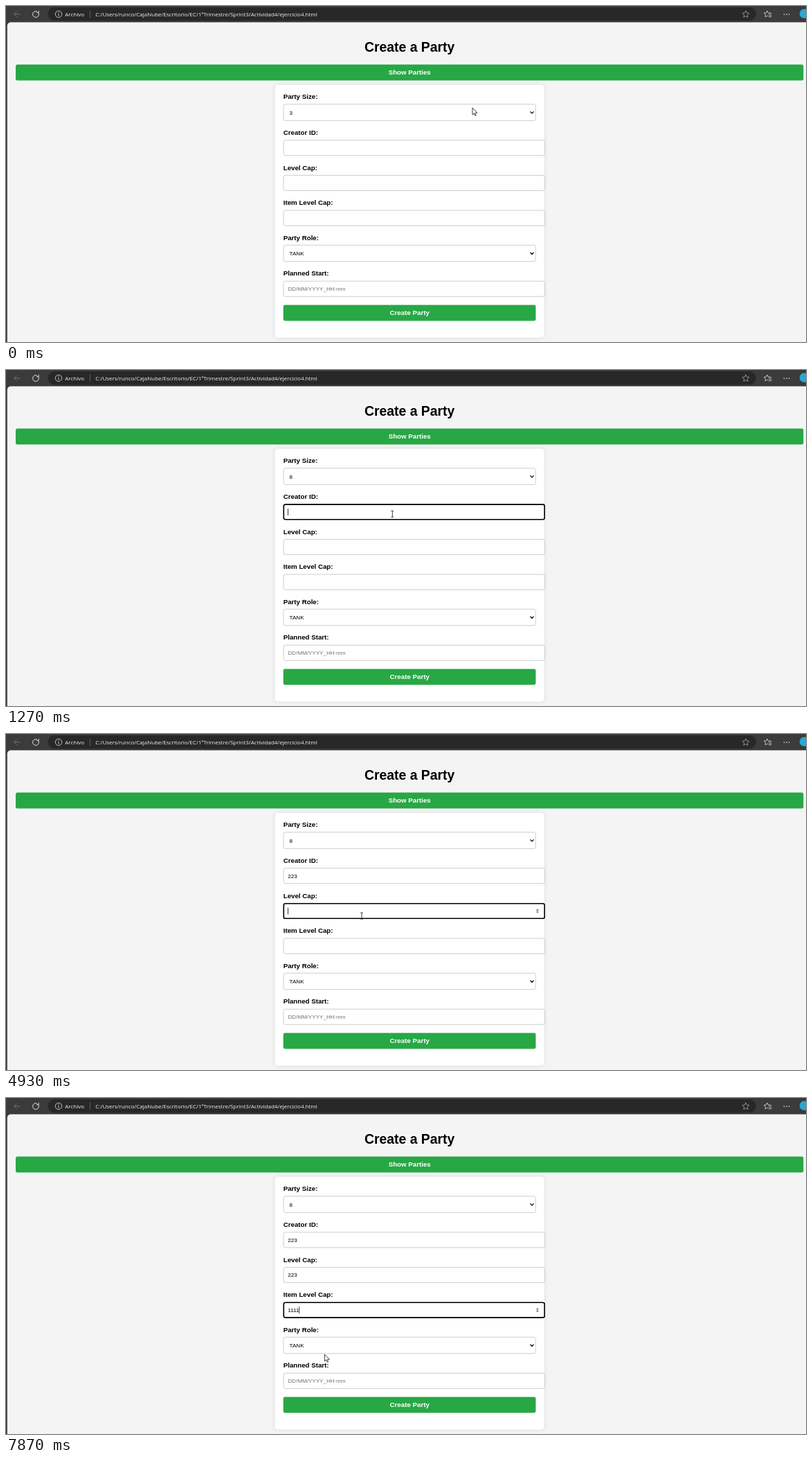
Write an HTML page with a canvas that moves like this. It is 1156 px wide and 485 px high and loops after 8000 ms.

```html
<!DOCTYPE html>
<html lang="es">
<head>
<meta charset="utf-8">
<title>Create a Party</title>
<style>
html, body { margin: 0; width: 100%; height: 100%; overflow: hidden; background: #3b3b3b; }
canvas { display: block; width: 1156px; height: 485px; }
</style>
</head>
<body>
<canvas id="stage"></canvas>
<script>
const W = 1156, H = 485, LOOP = 8000, TICKS_PER_SECOND = 15;
const canvas = document.getElementById('stage');
const dpr = window.devicePixelRatio || 1;
canvas.width = W * dpr;
canvas.height = H * dpr;
const ctx = canvas.getContext('2d');
ctx.scale(dpr, dpr);

const SANS = '"Liberation Sans", Arial, sans-serif';
const SMALL = `8.1px ${SANS}`;
const LABEL = `bold 9.73px ${SANS}`;
const TITLE = `bold 19.4px ${SANS}`;
const CHROME = '8px "Open Sans", "Noto Sans", sans-serif';
const GREEN = '#28a745';

const LEFT = 400.7, SELECT_W = 364.8, INPUT_W = 378, INPUT_H = 22.7;
const labels = [['Party Size:', 134.4], ['Creator ID:', 186], ['Level Cap:', 236.6],
  ['Item Level Cap:', 287.2], ['Party Role:', 337.8], ['Planned Start:', 389.4]];
const inputs = [
  { y: 193.5 }, { y: 244.1, number: true }, { y: 294.7, number: true },
  { y: 396.9, hint: 'DD/MM/YYYY_HH:mm' }
];

// Times below are in ticks of 1/15 s.
const edits = [[19.15, 0, ''], [40, 0, '2'], [60, 0, '22'], [66, 0, '223'],
  [74, 1, ''], [79, 1, '2'], [83, 1, '22'], [93, 1, '223'],
  [97, 2, ''], [105, 2, '1'], [109, 2, '11'], [111, 2, '111'], [114, 2, '1111']];
const pointerPath = [[0, 674, 147], [1, 674, 147], [2, 670, 149], [4, 640, 172], [6, 602, 203],
  [8, 579, 215.5], [12, 558.3, 207.8], [24, 558.3, 207.8], [26, 556.8, 199.8], [44, 556.8, 199.8],
  [49, 519, 276], [53, 514, 262.5], [84, 514, 262.5], [87, 498.4, 276.4], [90, 498.4, 276.4],
  [95, 465, 308.5], [113, 465, 308.5], [118, 460.4, 370]];
const POPUP_OPEN = 3, POPUP_CLOSE = 15, TEXT_POINTER = 17, BLINK = 7.92;

function box(x, y, w, h, r, fill, stroke, width = 0.9) {
  ctx.beginPath();
  ctx.roundRect(x, y, w, h, r);
  if (fill) { ctx.fillStyle = fill; ctx.fill(); }
  if (stroke) { ctx.strokeStyle = stroke; ctx.lineWidth = width; ctx.stroke(); }
}

function write(str, x, y, font, color = '#000', align = 'left') {
  ctx.font = font;
  ctx.fillStyle = color;
  ctx.textAlign = align;
  ctx.fillText(str, x, y);
}

function line(points, color, width) {
  ctx.beginPath();
  points.forEach(([x, y]) => ctx.lineTo(x, y));
  ctx.strokeStyle = color;
  ctx.lineWidth = width;
  ctx.stroke();
}

function polygon(points, fill) {
  ctx.beginPath();
  points.forEach(([x, y]) => ctx.lineTo(x, y));
  ctx.closePath();
  if (fill) { ctx.fillStyle = fill; ctx.fill(); }
}

function disc(x, y, r, fill) {
  ctx.beginPath();
  ctx.arc(x, y, r, 0, Math.PI * 2);
  ctx.fillStyle = fill;
  ctx.fill();
}

function shadowed(blur, alpha, dy, draw) {
  ctx.save();
  ctx.shadowColor = `rgba(0,0,0,${alpha})`;
  ctx.shadowBlur = blur * dpr;
  ctx.shadowOffsetY = dy * dpr;
  draw();
  ctx.restore();
}

function star(x, y, r, color) {
  const points = Array.from({ length: 10 }, (_, i) => {
    const a = i * Math.PI / 5 - Math.PI / 2, d = i % 2 ? r * 0.48 : r;
    return [x + d * Math.cos(a), y + d * Math.sin(a)];
  });
  polygon(points);
  ctx.strokeStyle = color;
  ctx.lineWidth = 0.8;
  ctx.stroke();
}

function drawBrowserBar() {
  const light = '#e4e4e4';
  ctx.fillStyle = '#3b3b3b';
  ctx.fillRect(0, 0, W, H);
  box(60.5, 2, 1023.5, 19.3, 9.6, '#282828');

  line([[21, 11.8], [11.8, 11.8]], '#777', 0.9);
  line([[15.8, 7.8], [11.8, 11.8], [15.8, 15.8]], '#777', 0.9);

  ctx.beginPath();
  ctx.arc(43, 12, 4.4, -0.5, Math.PI * 2 - 1.1);
  ctx.strokeStyle = light;
  ctx.lineWidth = 1;
  ctx.stroke();
  line([[47.2, 6.8], [47.2, 9.7], [44.2, 9.7]], light, 1);

  ctx.beginPath();
  ctx.arc(76, 11.8, 4.7, 0, Math.PI * 2);
  ctx.lineWidth = 0.8;
  ctx.stroke();
  line([[76, 11.2], [76, 14.4]], light, 0.9);
  disc(76, 9.5, 0.6, light);

  write('Archivo', 85.3, 14.8, CHROME, '#f0f0f0');
  line([[121.5, 6.5], [121.5, 17]], '#6a6a6a', 0.8);
  write('C:/Users/runco/CajaNube/Escritorio/EC/1ºTrimestre/Sprint3/Actividad4/ejercicio4.html',
    129.3, 14.8, CHROME, '#f0f0f0');

  star(1069, 12, 5.3, '#aaa');
  star(1099.8, 11.8, 4.9, light);
  ctx.fillStyle = '#3b3b3b';
  ctx.fillRect(1101.3, 10.6, 6, 7);
  [10.8, 13.2, 15.6].forEach(y => line([[1102, y], [1106.3, y]], light, 0.8));
  [1124.4, 1128, 1131.6].forEach(x => disc(x, 12, 0.85, light));
  disc(1153.5, 11, 6.8, '#2ba6d8');
}

function drawSelect(y, h, value, focused) {
  box(LEFT + 0.4, y, SELECT_W - 0.6, h, 2.4, '#fff', focused ? '#000' : '#c8c8c8', focused ? 1.5 : 0.9);
  write(value, 409.6, y + h / 2 + 2.9, SMALL);
  const m = y + h / 2;
  line([[757.5, m - 1.2], [760, m + 1.3], [762.5, m - 1.2]], '#000', 1.3);
}

function drawSpinner(y) {
  const m = y + INPUT_H / 2;
  polygon([[765.8, m - 0.8], [770, m - 0.8], [767.9, m - 2.9]], '#555');
  polygon([[765.8, m + 0.8], [770, m + 0.8], [767.9, m + 2.9]], '#555');
}

function drawInput(input, value, focused, hovered, caret) {
  const { y } = input, base = y + INPUT_H / 2 + 2.9, x = 407.2;
  box(LEFT + 0.4, y + 0.3, INPUT_W - 0.7, INPUT_H - 0.6, 2.4, '#fff', '#c8c8c8');
  if (focused) box(LEFT + 0.6, y + 0.6, INPUT_W - 1.1, INPUT_H - 1.1, 2.4, null, '#000', 1.6);
  if (input.hint) write(input.hint, x, base, SMALL, '#757575');
  write(value, x, base, SMALL);
  if (caret) {
    ctx.fillStyle = '#000';
    ctx.fillRect(x + ctx.measureText(value).width, base - 7.6, 0.8, 9.6);
  }
  if (input.number && (focused || hovered)) drawSpinner(y);
}

function drawButton(label, x, y, w) {
  box(x, y, w, 23.1, 2.4, GREEN);
  write(label, 583.2, y + 14.9, LABEL, '#fff', 'center');
}

function drawPopup(tick) {
  const top = 168.2, row = 14.7;
  const active = tick < 5 ? 0 : tick < 7 ? 1 : 2;
  shadowed(4, 0.35, 1.5, () => box(401, top, 364.5, row * 3 + 0.8, 0, '#fff'));
  ['3', '5', '8'].forEach((value, i) => {
    const y = top + 0.4 + i * row;
    if (i === active) {
      ctx.fillStyle = '#767676';
      ctx.fillRect(401, y, 364.5, row);
    }
    write(value, 409.6, y + 10.3, SMALL, i === active ? '#fff' : '#000');
  });
  box(401.2, top, 364.2, row * 3 + 0.6, 0, null, '#686868', 0.9);
}

function pointerAt(tick) {
  const next = pointerPath.findIndex(([at]) => at > tick);
  if (next < 0) return pointerPath[pointerPath.length - 1].slice(1);
  const [t0, x0, y0] = pointerPath[next - 1], [t1, x1, y1] = pointerPath[next];
  const k = (tick - t0) / (t1 - t0);
  return [x0 + (x1 - x0) * k, y0 + (y1 - y0) * k];
}

function drawPointer(x, y, overText) {
  if (overText) {
    line([[x - 2, y - 4.4], [x + 2, y - 4.4]], '#222', 0.8);
    line([[x, y - 4.4], [x, y + 4.6]], '#222', 0.9);
    line([[x - 2, y + 4.6], [x + 2, y + 4.6]], '#222', 0.8);
    return;
  }
  const arrow = [[0, 0], [0, 10], [2.3, 7.9], [3.8, 11.4], [5.3, 10.8], [3.9, 7.4], [7, 7.2]];
  polygon(arrow.map(([dx, dy]) => [x + dx, y + dy]), '#fff');
  ctx.strokeStyle = '#111';
  ctx.lineWidth = 0.8;
  ctx.stroke();
}

function render(time) {
  const tick = Math.floor((time % LOOP + 4) * TICKS_PER_SECOND / 1000);
  const [px, py] = pointerAt(tick);
  const values = ['', '', '', ''];
  let focus = -1, editedAt = 0;
  for (const [at, field, value] of edits) {
    if (tick < Math.floor(at)) break;
    values[field] = value;
    focus = field;
    editedAt = at;
  }
  const caretOn = Math.floor(Math.max(0, tick - editedAt) / BLINK) % 2 === 0;
  const hover = tick < TEXT_POINTER ? -1 : inputs.findIndex(({ y }) => py >= y && py <= y + INPUT_H);

  drawBrowserBar();
  box(1.8, 23.6, W, H, [5, 0, 0, 0], '#f4f4f4');
  write('Create a Party', 583.1, 66.3, TITLE, '#000', 'center');
  drawButton('Show Parties', 14, 84.5, 1138.3);
  shadowed(6, 0.1, 0, () => box(388.6, 113.8, 389.1, 365, 4.9, '#fff'));
  labels.forEach(([label, y]) => write(label, LEFT, y, LABEL));
  drawSelect(141.8, 23.6, tick < POPUP_CLOSE ? '3' : '8', tick >= POPUP_CLOSE && tick < 19);
  drawSelect(345.2, 23.6, 'TANK');
  inputs.forEach((input, i) =>
    drawInput(input, values[i], i === focus, i === hover, i === focus && caretOn));
  drawButton('Create Party', LEFT, 431.4, SELECT_W);
  if (tick >= POPUP_OPEN && tick < POPUP_CLOSE) drawPopup(tick);
  drawPointer(px, py, hover >= 0);
}

const start = performance.now();
function frame() {
  render(performance.now() - start);
  requestAnimationFrame(frame);
}
frame();
</script>
</body>
</html>
```
